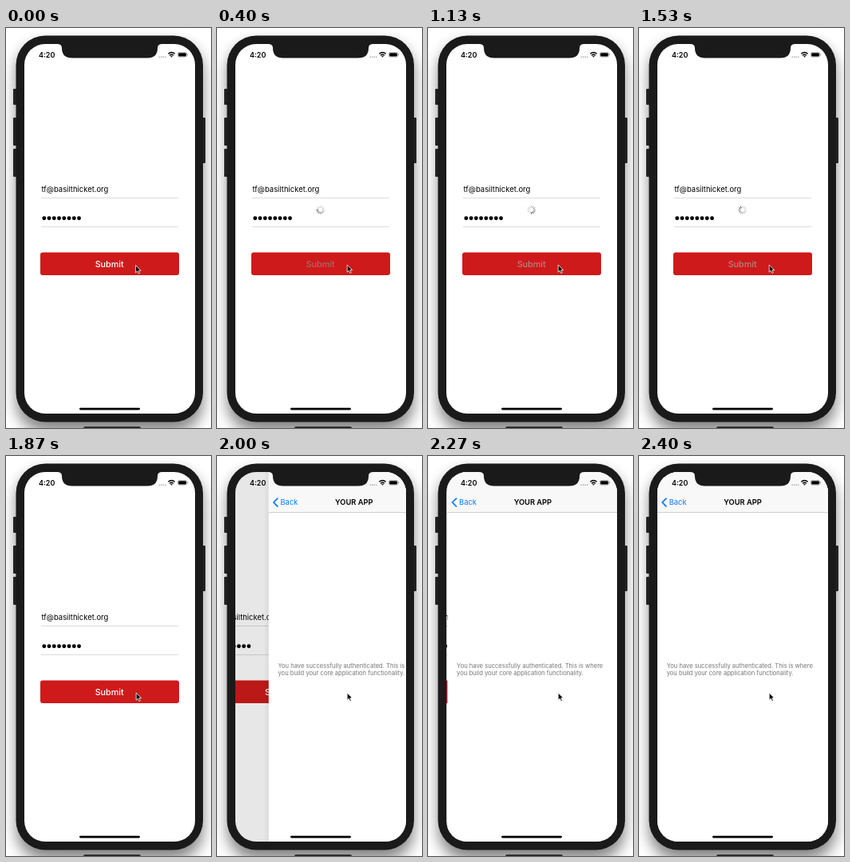
Animation of 257x500 px, one loop 2590 ms. Source, as an HTML page:

```html
<!DOCTYPE html>
<html lang="en">
<head>
<meta charset="utf-8">
<title>Login flow</title>
<style>
  html, body { margin: 0; width: 100%; height: 100%; overflow: hidden; background: #fff; }
  svg { display: block; width: 100%; height: 100%; }
  text { font-family: Inter, Roboto, sans-serif; }
</style>
</head>
<body>
<svg viewBox="0 0 257 500">
  <defs>
    <filter id="soft" x="-30%" y="-15%" width="160%" height="130%"><feGaussianBlur stdDeviation="9"/></filter>
    <clipPath id="screen"><rect x="23" y="20" width="214" height="462" rx="26"/></clipPath>
    <linearGradient id="edge"><stop stop-opacity="0"/><stop offset="1" stop-opacity=".06"/></linearGradient>
  </defs>

  <!-- Phone body -->
  <rect x="13" y="19" width="234" height="486" rx="37" opacity=".48" filter="url(#soft)"/>
  <g fill="#222">
    <rect x="9" y="76" width="6" height="20" rx="1"/>
    <rect x="9" y="112" width="6" height="35" rx="1"/>
    <rect x="9" y="151" width="6" height="35" rx="1"/>
    <rect x="245" y="112" width="5" height="57" rx="1"/>
  </g>
  <rect x="12.5" y="9.5" width="234.5" height="483" rx="37" fill="#1a1a1a"/>
  <rect x="97" y="498.3" width="72" height="4" rx="2" fill="#222"/>

  <g clip-path="url(#screen)">
    <rect x="23" y="20" width="214" height="462" fill="#fff"/>

    <g id="login">
      <text x="44.5" y="205" font-size="9.45">tf@basilthicket.org</text>
      <g id="password"></g>
      <path d="M44 212.5H216M44 248.5H216" stroke="#dcdcdc"/>
      <rect x="43" y="280.5" width="174" height="28.5" rx="3" fill="#ce1a1b"/>
      <text id="submit" x="129.7" y="298.7" font-size="10.8" font-weight="500" text-anchor="middle">Submit</text>
      <g id="spinner" transform="translate(129.7 227.3)" stroke="#555" stroke-width="1.1" stroke-linecap="round"></g>
    </g>
    <rect id="dim" x="23" y="20" width="214" height="462"/>

    <g id="home">
      <rect x="17" y="20" width="6" height="462" fill="url(#edge)"/>
      <rect x="23" y="20" width="214" height="462" fill="#fff"/>
      <rect x="23" y="20" width="214" height="50" fill="#f8f8f8"/>
      <path d="M23 70.5H237" stroke="#cfcfcf"/>
      <path d="M34.5 52.7L29.2 58L34.5 63.3" fill="none" stroke="#0a7aff" stroke-width="1.7"/>
      <text x="37.7" y="61.4" font-size="9.4" fill="#0a7aff">Back</text>
      <text x="130" y="61.4" font-size="9.3" font-weight="600" text-anchor="middle">YOUR APP</text>
      <g font-size="7.6" fill="#777">
        <text x="34.7" y="264.7">You have successfully authenticated. This is where</text>
        <text x="34.7" y="274.3">you build your core application functionality.</text>
      </g>
    </g>

    <!-- Status bar, notch and home indicator -->
    <path d="M64 19H196V20Q190 20 190 25Q190 37.5 177 37.5H83Q70 37.5 70 25Q70 20 64 20Z" fill="#1a1a1a"/>
    <text x="41" y="37" font-size="9" font-weight="600">4:20</text>
    <path d="M191.5 36.3H200.5" stroke="#aaa" stroke-width="1.4" stroke-dasharray="1.4 1.1"/>
    <g fill="none" stroke="#000" stroke-width="1.4">
      <path d="M203.3 32.3Q207.5 28.7 211.7 32.3M205 34.3Q207.5 32.2 210 34.3"/>
      <path d="M206.5 35.3h2L207.5 36.4Z" stroke-width=".6" fill="#000"/>
    </g>
    <rect x="215.4" y="30.4" width="11.2" height="5.8" rx="1.7" fill="none" stroke="#888" stroke-width=".6"/>
    <rect x="216.2" y="31.2" width="9.6" height="4.2" rx="1"/>
    <path d="M227.6 32.2v2.2" stroke="#888" stroke-width=".9"/>
    <rect x="92" y="474.7" width="76" height="2.8" rx="1.4"/>
  </g>

  <path id="cursor" d="M0 0V9.2L2.1 7.2L3.6 10.5L5.1 9.8L3.7 6.6H6.5Z" stroke="#fff" stroke-width=".8"/>
</svg>
<script>
const LOOP = 2590, STEP = 200 / 3, SCREEN_WIDTH = 214;
const SLIDE_START = 1872, SLIDE_RATE = 0.01276;
const SPOKES = 12;
const byId = id => document.getElementById(id);

function add(parent, tag, attributes) {
  const node = document.createElementNS(parent.namespaceURI, tag);
  for (const name in attributes) node.setAttribute(name, attributes[name]);
  return parent.appendChild(node);
}

const move = (id, x, y = 0) => byId(id).setAttribute("transform", `translate(${x} ${y})`);

for (let i = 0; i < 8; i++) add(byId("password"), "circle", { cx: 47.8 + i * 6.25, cy: 237.7, r: 2.45 });
const spokes = Array.from({ length: SPOKES }, (_, i) =>
  add(byId("spinner"), "path", { d: "M0 -3V-5", transform: `rotate(${i * 360 / SPOKES})` }));

function draw(now) {
  // The screen refreshes in fixed steps of about 15 per second.
  const step = Math.floor((now % LOOP + 5) / STEP);
  const time = step * STEP;
  const loading = step >= 1 && step < 28;

  byId("submit").setAttribute("fill", !loading ? "#fff" : step < 9 ? "#a86a67" : "#b58380");
  byId("spinner").setAttribute("visibility", loading ? "visible" : "hidden");
  const head = Math.floor(time / 1000 * SPOKES) + 5;
  spokes.forEach((spoke, i) => {
    const age = ((head - i) % SPOKES + SPOKES) % SPOKES;
    spoke.setAttribute("opacity", Math.max(0.25, 0.9 - age * 0.09));
  });

  let offset = SCREEN_WIDTH;
  if (time > SLIDE_START) offset *= Math.exp(-SLIDE_RATE * (time - SLIDE_START));
  if (step >= 36) offset = 0;
  const covered = SCREEN_WIDTH - offset;
  move("home", offset);
  move("login", -0.3 * covered);
  byId("home").setAttribute("visibility", covered ? "visible" : "hidden");
  byId("dim").setAttribute("opacity", 0.115 * covered / SCREEN_WIDTH);

  if (step < 1) move("cursor", 162.6, 296.6);
  else move("cursor", 163.2, 296);
}

function tick() {
  draw(performance.now());
  requestAnimationFrame(tick);
}
tick();
</script>
</body>
</html>
```
